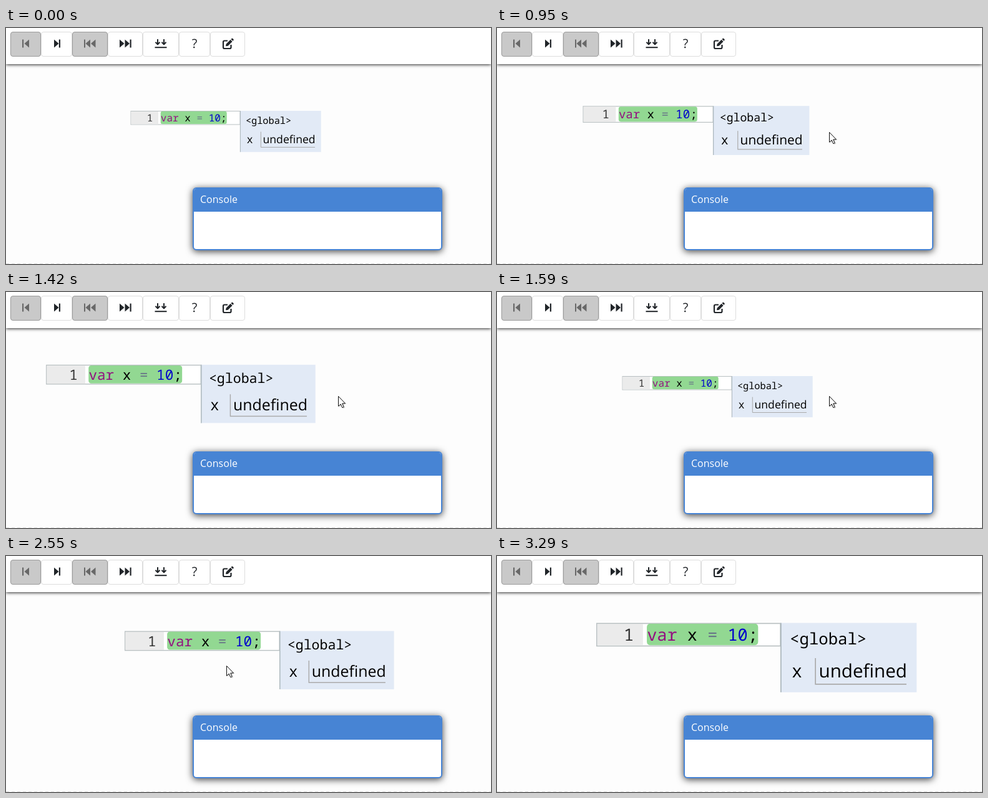
An HTML page for the animation above (3620 ms loop, 777 by 379 pixels).

```html
<!DOCTYPE html>
<html lang="en">
<head>
<meta charset="utf-8">
<title>Code stepper</title>
<style>
  html, body { margin: 0; width: 100%; height: 100%; overflow: hidden; background: #fdfdfd; }
  .stage { position: relative; width: 777px; height: 379px; overflow: hidden; background: #fdfdfd; }
  .bar { position: absolute; left: 0; top: 0; width: 777px; height: 58px; background: #fff;
    box-shadow: 0 1px 5px rgba(0, 0, 0, .85); }
  .btn { position: absolute; top: 6px; height: 40px; box-sizing: border-box;
    border: 1px solid #ddd; border-radius: 4px; background: #fff; }
  .btn.off { background: #c9c9c9; border-color: #9b9b9b; }
  svg { position: absolute; left: 0; top: 0; }
  text { white-space: pre; text-rendering: geometricPrecision; }
  .mono { font-family: "Noto Sans Mono", "DejaVu Sans Mono", monospace; font-size: 16px; }
  .sans { font-family: "Open Sans", "Noto Sans", sans-serif; font-size: 17.6px; }
  .console { position: absolute; left: 299px; top: 256px; width: 400px; height: 101px;
    box-sizing: border-box; border: 2px solid #4784d4; border-radius: 6px; background: #fff;
    box-shadow: 0 2px 12px rgba(0, 0, 0, .75); overflow: hidden; }
  .console div { height: 37px; padding-left: 10px; background: #4784d4; color: #fff;
    font: 16px/34px "Open Sans", "Noto Sans", sans-serif; }
</style>
</head>
<body>
<div class="stage">
  <div class="bar" id="bar"></div>

  <svg width="777" height="379" viewBox="0 0 777 379">
    <defs>
      <path id="tri" d="M0 0L7.5 6.5L0 13Z"/>
      <path id="down" d="M0 0V8M-3.5 4.8L0 8.4L3.5 4.8" fill="none" stroke="#212529" stroke-width="2"/>
    </defs>

    <!-- toolbar icons -->
    <g fill="#686868">
      <path d="M26 18.500h2.200v13h-2.200z"/>
      <use href="#tri" transform="translate(37 18.500) scale(-1 1)"/>
      <path d="M125 18.500h2v13h-2z"/>
      <use href="#tri" transform="translate(135 18.500) scale(-1 1)"/>
      <use href="#tri" transform="translate(143.500 18.500) scale(-1 1)"/>
    </g>
    <g fill="#212529">
      <use href="#tri" x="77" y="18.500"/>
      <path d="M84.800 18.500h2.200v13h-2.200z"/>
      <use href="#tri" x="182" y="18.500"/>
      <use href="#tri" x="190.500" y="18.500"/>
      <path d="M198.500 18.500h2.200v13h-2.200z"/>
      <use href="#down" x="243" y="18"/>
      <use href="#down" x="253" y="18"/>
      <path d="M238.500 30.200h19v2h-19z"/>
      <text class="sans" x="302" y="32" text-anchor="middle" style="font-size:20px">?</text>
      <path d="M355 20.500H350a2 2 0 0 0-2 2V31a2 2 0 0 0 2 2h8.500a2 2 0 0 0 2-2V27"
        fill="none" stroke="#212529" stroke-width="2.200"/>
      <path d="M352 29.300l.6-3.600 7-7 3 3-7 7zM360.400 17.900l1.100-1a1.300 1.300 0 0 1 1.800 0l1.100 1.100a1.300 1.300 0 0 1 0 1.800l-1 1z"/>
    </g>

    <path d="M0 378.500H777" stroke="#dedede" stroke-dasharray="5 4"/>

    <!-- code line and its scope -->
    <g id="panel">
      <rect x=".5" y=".5" width="175" height="21.500" fill="#fff" stroke="#b9c0c2"/>
      <rect x="1" y="1" width="43.500" height="20.500" fill="#ebebeb"/>
      <rect x="48.200" y=".8" width="106" height="20.400" rx="3" fill="#92d892"/>
      <text class="mono" x="26.200" y="17" fill="#333">1</text>
      <text class="mono" x="48.300" y="17"><tspan fill="#930f80">var</tspan> x <tspan fill="#687687">=</tspan> <tspan fill="#0000cd">10</tspan>;</text>
      <rect x="175.400" width="129.800" height="66.200" fill="#e2eaf6"/>
      <path d="M175.900 0V66.200" stroke="#a9b5ba"/>
      <text class="mono" x="184.400" y="20.600" style="font-size:15.250px">&lt;global></text>
      <text class="sans" x="186.500" y="52">x</text>
      <path d="M208.800 33.600V58.500H295.500" fill="none" stroke="#aaa"/>
      <text class="sans" x="212" y="52">undefined</text>
    </g>
  </svg>

  <div class="console"><div>Console</div></div>

  <svg width="777" height="379" viewBox="0 0 777 379">
    <g id="cursor">
      <path d="M2 2V18L6 14.500L8.500 20L11 19L8.500 13H13.500Z" fill="#000" opacity=".18"/>
      <path d="M.5 .5V16.500L4.200 13L6.800 18.800L9.200 17.700L6.700 12H11.500Z"
        fill="#fff" stroke="#111" stroke-linejoin="round"/>
    </g>
  </svg>
</div>

<script>
const LOOP = 3620, TICK = 30, ZOOM = 2 ** 0.25;
const SHOW = 460, HIDE = 3290;
const GRAB = 1870, DROP = 2260, GRIP = [110, 27.3];

// toolbar: left, right, disabled
[[7, 56, 1], [56, 106, 0], [106, 163, 1], [163, 219, 0],
 [219, 277, 0], [277, 327, 0], [327, 383, 0]].forEach(([left, right, off]) => {
  const btn = document.createElement("div");
  btn.className = off ? "btn off" : "btn";
  btn.style.left = left + "px";
  btn.style.width = right - left + "px";
  document.getElementById("bar").append(btn);
});

// pointer: time, x, y
const path = [
  [460, 590, 355], [700, 515, 137], [800, 515, 137], [920, 532, 167],
  [1690, 532, 167], [1870, 310.5, 162.3], [1930, 324, 157], [1960, 358, 156.3],
  [1990, 382, 158], [2020, 345, 163.3], [2089, 345, 163.3], [2090, 348, 167.9],
  [2230, 348, 167.9], [2350, 353, 176], [2640, 353, 176], [2760, 361, 179],
  [2790, 362, 180], [2930, 362, 180], [3290, 606, 390]
];

// panel corner at normal size and fully zoomed in
const first = { small: [199.5, 133], big: [-24, 105] };
const back = { small: [200.5, 135], big: [-24, 105] };
const last = { small: [238, 140.6], big: [159, 107.5] };

// time, corners, zoom level
const views = [
  [0, first, 0], [950, first, 1], [1020, first, 2], [1120, first, 3],
  [1420, back, 2], [1500, back, 1], [1590, back, 0],
  [2260, last, 0], [2460, last, 1], [2550, last, 2], [2580, last, 3]
];

const mix = (a, b, f) => a + (b - a) * f;
const latest = (list, t) => list.reduce((hit, key, i) => key[0] <= t ? i : hit, 0);

function pointerAt(t) {
  const i = latest(path, t), a = path[i], b = path[i + 1] || a;
  const done = Math.floor((t - a[0]) / TICK) * TICK;
  const f = b === a ? 0 : done / (b[0] - a[0]);
  return [mix(a[1], b[1], f), mix(a[2], b[2], f)];
}

function panelAt(t, pointer) {
  if (t >= GRAB && t < DROP) return [pointer[0] - GRIP[0], pointer[1] - GRIP[1], 1];
  const [, { small, big }, level] = views[latest(views, t)];
  const scale = ZOOM ** level, f = (scale - 1) / (ZOOM ** 3 - 1);
  return [mix(small[0], big[0], f), mix(small[1], big[1], f), scale];
}

const panel = document.getElementById("panel");
const cursor = document.getElementById("cursor");
const start = performance.now();

function draw() {
  const t = (performance.now() - start) % LOOP;
  const pointer = pointerAt(t);
  const [x, y, scale] = panelAt(t, pointer);
  panel.setAttribute("transform", `translate(${x} ${y}) scale(${scale})`);
  cursor.setAttribute("transform", `translate(${pointer[0]} ${pointer[1]})`);
  cursor.style.display = t >= SHOW && t < HIDE ? "" : "none";
  requestAnimationFrame(draw);
}
draw();
</script>
</body>
</html>
```
